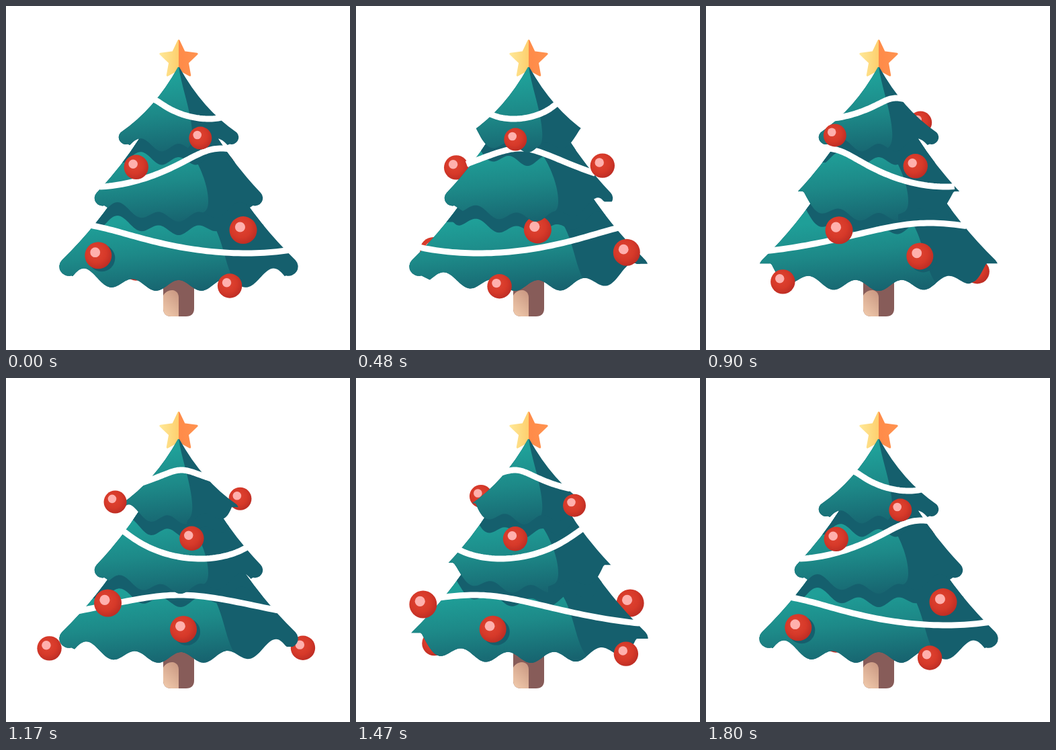
These frames come from a looping animation (512x512 px, 1830 ms). An HTML page:

```html
<!DOCTYPE html>
<html lang="en">
<head>
<meta charset="utf-8">
<title>Turning Christmas tree</title>
<style>
html, body { margin: 0; width: 100%; height: 100%; overflow: hidden; background: #fff; }
svg { display: block; width: 100vw; height: 100vh; }
</style>
</head>
<body>
<svg id="stage" viewBox="0 0 512 512"></svg>
<script>
const CX = 257, TURN = 1800, LOOP = 1830, STEP = 30, TAU = 2 * Math.PI;
const DARK = '#155f6d';

// Tiers from bottom to top; cone points are offsets from the axis, mirrored on the right.
const tiers = [
  {
    cone: { top: [80, 262], bend: [120, 326], tip: [164, 388], r: 14, floor: 480 },
    light: 'M60 250H255L285 300C325 325 322 385 342 412V440H60Z',
    wave: { base: 416, drop: 22, power: 3, limit: 160, amp: 8, length: 68, turns: 3, phase: Math.PI },
    garland: { mid: 345.5, amp: 22.5, start: 275, radius: 144, slope: .9 }
  },
  {
    cone: { top: [45, 175], bend: [78, 232], tip: [114, 286], r: 11.5, floor: 370 },
    light: 'M90 170H245L262 205C281 217 301 262 301 290C301 304 297 307 286 310V380H90Z',
    wave: { base: 314.5, drop: 23, power: 2, limit: 112, amp: 6.5, length: 57.5, turns: 3, phase: 0 },
    garland: { mid: 240.5, amp: -28.5, start: 400, radius: 91, slope: .7 }
  },
  {
    cone: { top: [1, 91], bend: [36, 154], tip: [79, 195.5], r: 10.5, floor: 240 },
    light: 'M257 90C261 118 270 140 275 170C279 195 278 206 270 212L264 245H100V90Z',
    wave: { base: 211.5, drop: 15, power: 2, limit: 79, amp: 6.5, length: 53, turns: 2, phase: Math.PI },
    garland: { mid: 152.5, amp: 15.5, start: 320, radius: 50, slope: .86 }
  }
];

// Pairs of balls half an orbit apart; `turn` is when one leaves the front at the left edge.
const orbits = [
  { tier: 0, r: 20.5, turn: 1475, x: 254, y: 336, reach: 155, tilt: -1, dip: -3, ease: 0 },
  { tier: 0, r: 20, turn: 295, x: 259, y: 365, reach: 181, tilt: -2, dip: 9, ease: 0, shade: true },
  { tier: 0, r: 18.2, turn: 1180, x: 253, y: 402, reach: 190, tilt: 0, dip: 16, ease: .2 },
  { tier: 1, r: 18.2, turn: 410, x: 258, y: 239, reach: 118, tilt: -1.5, dip: 0, ease: 0 },
  { tier: 2, r: 17, turn: 1212, x: 255.5, y: 182, reach: 97.5, tilt: -1, dip: 17, ease: 0 }
];

const $ = id => document.getElementById(id);
const num = v => v.toFixed(2);

function conePath({ top, bend, tip: [x, y], r, floor }) {
  const at = (side, [d, py]) => `${num(CX + side * d)} ${num(py)}`;
  const outer = [x + .7 * r, y - .7 * r], under = [x - .3 * r, y + .95 * r];
  const arc = `A${r} ${r} 0 0 0 `;
  return `M${at(-1, top)}Q${at(-1, bend)} ${at(-1, outer)}${arc}${at(-1, under)}L${CX} ${floor}` +
    `L${at(1, under)}${arc}${at(1, outer)}Q${at(1, bend)} ${at(1, top)}Z`;
}

// The scalloped hem slides left; its waves deepen at the sides, where it curves upward.
function wavePath(w, t, shift) {
  let path = 'M40 60';
  for (let x = 40; x <= 474; x += 2) {
    const d = Math.max(-w.limit, Math.min(w.limit, x - CX));
    const edge = Math.abs(d) / w.limit;
    const amp = w.amp + 10 * edge ** 8;
    const angle = TAU * (d / w.length + w.turns * t / TURN) + w.phase;
    path += `L${x} ${num(w.base + shift - w.drop * edge ** w.power + amp * Math.cos(angle))}`;
  }
  return path + 'V60Z';
}

function garlandPath(g, t) {
  const points = [];
  for (let s = -1.06; s <= 1.06; s += .04) {
    const y = g.mid + g.amp * Math.cos(s * TAU / 4 + TAU * (t - g.start) / TURN);
    points.push(`${num(CX + (g.radius + g.slope * (y - g.mid)) * s)} ${num(y)}`);
  }
  return 'M' + points.join('L');
}

// Sweeps right behind the tree for one turn, then left in front of it for the next.
function ballAt(o, t) {
  const u = ((t - o.turn) / TURN + 4) % 2;
  const behind = u > 0 && u < 1;
  const q = behind ? 2 * u - 1 : 3 - 2 * u;
  const bow = 1 - q * q;
  return {
    behind,
    x: o.x + o.reach * (q + o.ease * bow * (q + .3)),
    y: o.y + o.tilt * q + o.dip * bow * (behind ? -.8 : 1)
  };
}

const ballMarkup = (id, r) => `<g id="${id}"><circle r="${r}" fill="url(#red)"/>
  <circle cx="-4.6" cy="-4.6" r="${r * .37}" fill="#ffb0ad"/></g>`;

const pairs = (keep, markup) => orbits.map((o, i) => keep(o)
  ? [0, 1].map(n => markup(o, `${i}${n}`)).join('') : '').join('');

const tierMarkup = (tier, i) => `
  <g clip-path="url(#cone${i})"><g clip-path="url(#skirt${i})">
    <rect width="512" height="512" fill="${DARK}"/>
    <path d="${tier.light}" fill="url(#teal${i})"/>
    ${i < 2 ? `<path id="shadow${i}" fill="${DARK}"/>` : ''}
    ${pairs(o => o.shade && o.tier === i, (o, key) => `<circle id="shade${key}" r="${o.r}" fill="${DARK}"/>`)}
  </g></g>
  <path id="garland${i}" fill="none" stroke="#fff" stroke-width="9"/>
  ${pairs(o => o.tier === i, (o, key) => ballMarkup('front' + key, o.r))}`;

const star = Array.from({ length: 10 }, (_, i) => {
  const radius = i % 2 ? 14 : 28.5, a = i * TAU / 10;
  return `${num(CX + radius * Math.sin(a))},${num(80 - radius * Math.cos(a))}`;
}).join(' ');

$('stage').innerHTML = `
  <defs>
    ${tiers.map(({ cone, wave }, i) => `
      <clipPath id="cone${i}"><path d="${conePath(cone)}"/></clipPath>
      <clipPath id="skirt${i}"><path id="wave${i}"/></clipPath>
      <linearGradient id="teal${i}" gradientUnits="userSpaceOnUse"
        x1="240" y1="${wave.base - 115}" x2="254" y2="${wave.base + 9}">
        <stop offset=".1" stop-color="#1f9f98"/><stop offset=".5" stop-color="#1d8988"/>
        <stop offset="1" stop-color="#17636f"/>
      </linearGradient>`).join('')}
    <radialGradient id="red" cx=".42" cy=".4" r=".62">
      <stop offset="0" stop-color="#e04432"/><stop offset=".6" stop-color="#d63929"/>
      <stop offset="1" stop-color="#bd2d24"/>
    </radialGradient>
    <linearGradient id="gold" gradientUnits="userSpaceOnUse" x1="228" y1="0" x2="286" y2="0">
      <stop offset="0" stop-color="#ffe998"/><stop offset=".5" stop-color="#fdcf6e"/>
      <stop offset=".5" stop-color="#ff8a48"/><stop offset="1" stop-color="#ff9350"/>
    </linearGradient>
    <linearGradient id="wood" x1=".8" y1="0" x2=".2" y2="1">
      <stop offset="0" stop-color="#cb9983"/><stop offset="1" stop-color="#efc8aa"/>
    </linearGradient>
  </defs>
  ${pairs(() => true, (o, key) => ballMarkup('back' + key, o.r))}
  <path d="M234 395H280V450Q280 462 268 462H246Q234 462 234 450Z" fill="#875c59"/>
  <path d="M234 431C240 420 257 420 257 434V462H246Q234 462 234 450Z" fill="url(#wood)"/>
  <polygon points="${star}" fill="url(#gold)" stroke="url(#gold)" stroke-width="3" stroke-linejoin="round"/>
  ${tiers.map(tierMarkup).join('')}`;

function place(id, x, y, visible) {
  const el = $(id);
  el.setAttribute('transform', `translate(${num(x)} ${num(y)})`);
  el.setAttribute('visibility', visible ? 'visible' : 'hidden');
}

function draw(t) {
  tiers.forEach((tier, i) => {
    $('wave' + i).setAttribute('d', wavePath(tier.wave, t, 0));
    $('garland' + i).setAttribute('d', garlandPath(tier.garland, t));
    if (i < 2) $('shadow' + i).setAttribute('d', wavePath(tiers[i + 1].wave, t, 20));
  });
  orbits.forEach((o, i) => [0, 1].forEach(n => {
    const { x, y, behind } = ballAt(o, t + n * TURN);
    place(`front${i}${n}`, x, y, !behind);
    place(`back${i}${n}`, x, y, behind);
    if (o.shade) place(`shade${i}${n}`, x + 5, y + 4, !behind);
  }));
}

const begin = performance.now();
function tick() {
  const elapsed = (performance.now() - begin) % LOOP;
  draw(Math.floor(elapsed / STEP) * STEP);
  requestAnimationFrame(tick);
}
tick();
</script>
</body>
</html>
```
